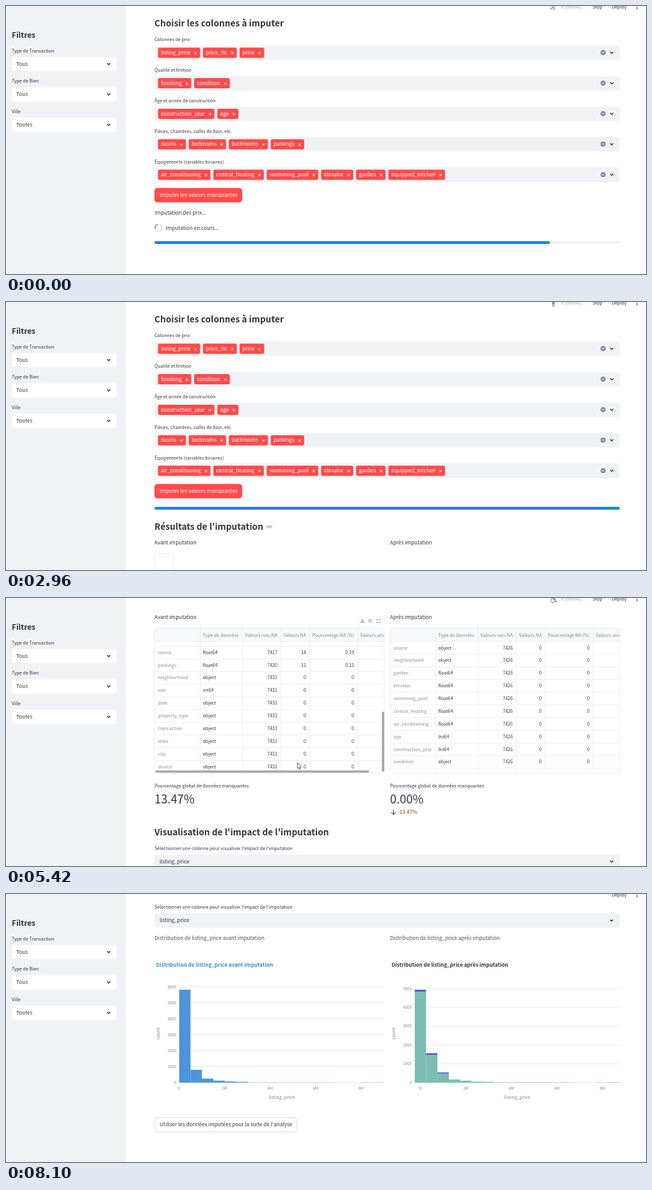
An HTML page with a canvas that plays this animation: 1000 px wide and 420 px high, repeating every 8200 ms.

```html
<!DOCTYPE html>
<html lang="fr">
<head>
<meta charset="utf-8">
<title>Imputation</title>
<style>
html, body { margin: 0; width: 1000px; height: 420px; overflow: hidden; background: #fff; }
canvas { display: block; }
</style>
</head>
<body>
<canvas id="stage" width="1000" height="420"></canvas>
<script>
const ctx = document.getElementById('stage').getContext('2d');
const LOOP = 8200;
const FAMILY = '"Noto Sans CJK JP", "Noto Sans CJK SC", "Noto Sans CJK KR", "Noto Sans CJK TC", "Noto Sans", sans-serif';
const INK = '#31333f', GRAY = '#808495', PANEL = '#f0f2f6', RED = '#ff4b4b', BLUE = '#1c83e1', LINE = '#e6e8ee';
const TINY = 6.1, SMALL = 7.1, BODY = 8.14, TITLE = 13.7, METRIC = 18.3;

// Text is laid out at ten times its size so that advances stay fractional.
function text(str, x, y, size = BODY, color = INK, align = 'left', weight = 400) {
  ctx.save();
  ctx.translate(x, y + size * 0.34);
  ctx.scale(0.1, 0.1);
  ctx.font = `${weight} ${size * 10}px ${FAMILY}`;
  ctx.textAlign = align;
  ctx.fillStyle = color;
  ctx.fillText(str, 0, 0);
  ctx.restore();
}
function textWidth(str, size) {
  ctx.font = `400 ${size * 10}px ${FAMILY}`;
  return ctx.measureText(str).width / 10;
}
function rect(x, y, w, h, color) {
  ctx.fillStyle = color;
  ctx.fillRect(x, y, w, h);
}
function box(x, y, w, h, r, fill, stroke) {
  ctx.beginPath();
  ctx.roundRect(x, y, w, h, r);
  if (fill) { ctx.fillStyle = fill; ctx.fill(); }
  if (stroke) { ctx.strokeStyle = stroke; ctx.lineWidth = 0.8; ctx.stroke(); }
}
function path(points, color, width = 1, x = 0, y = 0) {
  ctx.beginPath();
  points.forEach(([px, py]) => ctx.lineTo(x + px, y + py));
  ctx.strokeStyle = color;
  ctx.lineWidth = width;
  ctx.stroke();
}
function ring(x, y, r, color, width = 1, from = 0, to = Math.PI * 2) {
  ctx.beginPath();
  ctx.arc(x, y, r, from, to);
  ctx.strokeStyle = color;
  ctx.lineWidth = width;
  ctx.stroke();
}
function dot(x, y, r, color) {
  ctx.beginPath();
  ctx.arc(x, y, r, 0, Math.PI * 2);
  ctx.fillStyle = color;
  ctx.fill();
}
function cross(x, y, r, color, width) {
  path([[-r, -r], [r, r]], color, width, x, y);
  path([[-r, r], [r, -r]], color, width, x, y);
}
const chevron = (x, y) => path([[-2.4, -1.2], [0, 1.2], [2.4, -1.2]], INK, 1.4, x, y);

function ease(t, from, to) {
  const p = Math.min(1, Math.max(0, (t - from) / (to - from)));
  return p * p * (3 - 2 * p);
}
const pageScroll = t => 52 * ease(t, 3570, 4080) + 294.5 * ease(t, 4325, 5000)
  + 125 * ease(t, 5760, 6190) + 246.5 * ease(t, 7110, 7980);
const tableScroll = t => 291 * ease(t, 4950, 5410);

// Form
const groups = [
  ['Colonnes de prix', 'listing_price price_ttc price'],
  ['Qualité et finition', 'finishing condition'],
  ['Âge et année de construction', 'construction_year age'],
  ['Pièces, chambres, salles de bain, etc.', 'rooms bedrooms bathrooms parkings'],
  ['Équipements (variables binaires)', 'air_conditioning central_heating swimming_pool elevator garden equipped_kitchen']
];
function drawForm() {
  text('Choisir les colonnes à imputer', 232, 27.7, TITLE, INK, 'left', 700);
  groups.forEach(([label, names], i) => {
    const y = 73.3 + 47.8 * i;
    text(label, 232, y - 20.3, SMALL);
    box(232, y - 11.2, 727, 22.4, 4.5, PANEL);
    let x = 237.5;
    for (const name of names.split(' ')) {
      const w = textWidth(name, BODY);
      box(x, y - 8, w + 19.4, 16, 2.3, RED);
      text(name, x + 4.5, y, BODY, '#fff');
      cross(x + w + 12.4, y + 0.4, 1.9, '#fff', 1);
      x += w + 23.8;
    }
    dot(933, y - 0.3, 3.9, GRAY);
    cross(933, y - 0.3, 1.4, '#fff', 0.9);
    chevron(946.5, y - 0.2);
  });
  box(232, 285.3, 137, 22.4, 4.5, RED);
  text('Imputer les valeurs manquantes', 240, 296.5, BODY, '#fff');
}
function progressBar(y, share) {
  box(232, y - 2.3, 727, 4.6, 2.3, PANEL);
  box(232, y - 2.3, 727 * share, 4.6, 2.3, BLUE);
}
function drawProgress(t) {
  text('Imputation des prix...', 232, 324.2);
  text('Imputation en cours...', 249.5, 348.2);
  const angle = 2.9 + t / 630 * Math.PI * 2;
  ring(238.3, 347.8, 5.4, '#d3d6dc', 1.3);
  ring(238.3, 347.8, 5.4, '#5d84ab', 1.3, angle, angle + Math.PI / 2);
  progressBar(370.8, t < 2690 ? 0.85 : 1);
}

// Tables
const missing = {
  age: 4969, construction_year: 4968, condition: 1974, finishing: 1893, price: 1764, price_ttc: 1712,
  listing_price: 1650, air_conditioning: 1320, central_heating: 1320, swimming_pool: 1320, elevator: 1320,
  garden: 1320, equipped_kitchen: 1320, bathrooms: 41, bedrooms: 27, rooms: 14, parkings: 11,
  neighborhood: 0, size: 0, date: 0, property_type: 0, transaction: 0, state: 0, city: 0, source: 0
};
const objects = 'condition finishing neighborhood date property_type transaction state city source'.split(' ');
const typeOf = (name, ints) => objects.includes(name) ? 'object' : ints[name] || 'float64';
const before = Object.entries(missing).map(([name, n]) =>
  [name, typeOf(name, { size: 'int64' }), 7431 - n, n, n ? (n / 74.31).toFixed(2) : 0]);
const after = ('source neighborhood garden elevator swimming_pool central_heating air_conditioning ' +
  'age construction_year condition').split(' ').map(name =>
  [name, typeOf(name, { age: 'Int64', construction_year: 'Int64' }), 7426, 0, 0]);
const TOP = 393.8, HEIGHT = 227, HEAD = 20.6, ROW = 19.88;

function drawTable(x, rows, scroll) {
  const cells = (values, y, ink, first) => {
    text(values[0], x + 5.5, y, SMALL, first);
    text(values[1], x + 75.5, y, SMALL, ink);
    [192, 237, 312].forEach((edge, i) => text(String(values[i + 2]), x + edge, y, SMALL, ink, 'right'));
  };
  ctx.save();
  ctx.beginPath();
  ctx.roundRect(x, TOP, 359, HEIGHT, 4.5);
  ctx.clip();
  rect(x, TOP, 359, HEIGHT, '#fff');
  rows.forEach((row, i) => {
    const y = 424.6 + ROW * i - scroll;
    if (y < TOP || y > TOP + HEIGHT + 12) return;
    cells(row, y, INK, '#8b8e99');
    rect(x, y + ROW / 2 - 0.3, 359, 0.7, LINE);
  });
  rect(x, TOP, 359, HEAD, '#f8f9fb');
  rect(x, TOP + HEAD - 0.3, 359, 0.8, LINE);
  cells(['', 'Type de données', 'Valeurs non-NA', 'Valeurs NA', 'Pourcentage NA (%)'], 405, GRAY, GRAY);
  text('Valeurs uniques', x + 321.5, 405, SMALL, GRAY);
  [71, 137, 197, 242, 317].forEach(c => rect(x + c, TOP, 0.7, HEIGHT, LINE));
  ctx.restore();
  box(x + 0.4, TOP, 358.6, HEIGHT, 4.5, null, LINE);
}
function drawToolbar(scroll) {
  const y = TOP - 11.3, ink = '#7a7d88';
  box(551, y - 7, 40, 14, 3, '#fff', '#f3f4f7');
  path([[0, -3], [0, 1]], ink, 0.9, 557, y);
  path([[-1.8, -0.8], [0, 1], [1.8, -0.8]], ink, 0.9, 557, y);
  path([[-2.5, 1], [-2.5, 2.5], [2.5, 2.5], [2.5, 1]], ink, 0.9, 557, y);
  ring(568.6, y - 0.6, 1.9, ink, 0.9);
  path([[1.2, 0.8], [3, 2.6]], ink, 1, 568.8, y);
  for (const sx of [-1, 1]) for (const sy of [-1, 1])
    path([[sx, sy * 2.5], [sx * 2.6, sy * 2.5], [sx * 2.6, sy]], ink, 0.9, 582, y);
  box(587.4, TOP + 1 + scroll / 291 * 130, 3.6, 94, 1.8, '#a6a7ad');
  if (scroll > 0) box(233, TOP + HEIGHT - 4, 334.5, 3.4, 1.7, '#a6a7ad');
}
function drawResults(t) {
  progressBar(323.2, 1);
  text("Résultats de l'imputation", 232, 352, TITLE, INK, 'left', 700);
  if (t < 3570) {
    for (const x of [408.8, 413.2]) box(x - 2, 350.3, 4, 3.6, 1.8, null, GRAY);
  }
  text('Avant imputation', 232, 377);
  text('Après imputation', 600, 377);
  if (t < 2990) {
    box(232.5, 394.3, 29, 60, 3, '#fff', '#f6dfe0');
    return;
  }
  const scroll = tableScroll(t);
  drawTable(232, before, scroll);
  drawTable(600, after, 0);
  if (t >= 4080 && t < 5780) drawToolbar(scroll);
  drawMetrics(t);
  drawCharts(t);
}

function drawMetrics(t) {
  for (const x of [232, 600]) text('Pourcentage global de données manquantes', x, 641.3, SMALL);
  text('13.47%', 232, 661.9, METRIC);
  text('0.00%', 600, 661.9, METRIC);
  const selected = 35.7 * ease(t, 6310, 6700);
  if (selected > 0) {
    ctx.save();
    ctx.beginPath();
    ctx.rect(600, 648.5, selected, 26);
    ctx.clip();
    rect(600, 648.5, selected, 26, '#3367d1');
    text('0.00%', 600, 661.9, METRIC, '#fff');
    ctx.restore();
  }
  const red = '#84301f';
  path([[0, -3.8], [0, 3.6]], red, 1.1, 605.5, 682);
  path([[-3.4, 0.4], [0, 3.8], [3.4, 0.4]], red, 1.1, 605.5, 682);
  text('-13.47%', 612, 682, BODY, red);
}

// Histograms
const BASE = 1013.5, BIN = 17.77;
const charts = [
  { x: 232, when: 'avant', color: '#4c95d9', tail: '#a9e0ea', unit: 25, max: 6, zero: 270.5,
    bars: [5820, 800, 250, 120, 70, 45], caps: [] },
  { x: 600, when: 'après', color: '#7dbdb1', tail: '#a5dcd8', unit: 29.4, max: 5, zero: 647.5,
    bars: [4850, 1480, 490, 165, 100, 45, 35], caps: [95, 85, 50] }
];
function drawCharts(t) {
  text("Visualisation de l'impact de l'imputation", 232, 714.2, TITLE, INK, 'left', 700);
  text("Sélectionner une colonne pour visualiser l'impact de l'imputation", 232, 738.7, SMALL);
  box(232, 748.4, 727, 22.4, 4.5, PANEL);
  text('listing_price', 240, 759.6);
  chevron(946.3, 759.4);
  for (const c of charts) {
    const title = `Distribution de listing_price ${c.when} imputation`;
    const left = c.x + 38.6;
    text(title, c.x, 787, BODY, '#4a4c58');
    text(title, c.x + 2.5, 829, BODY, c.when === 'avant' && t > 7950 ? '#4585c2' : INK, 'left', 700);
    for (let k = 0; k <= c.max; k++) {
      const y = BASE - k * c.unit;
      rect(left, y - 0.4, 320.4, 0.8, '#e6e8ec');
      text(String(k * 1000), c.x + 34, y, TINY, GRAY, 'right');
    }
    rect(left, BASE - 0.7, BIN * 14, 1, c.tail);
    rect(left + BIN * 16, BASE - 0.7, BIN * 2, 1, c.tail);
    c.bars.forEach((n, i) => {
      const h = n * c.unit / 1000, cap = (c.caps[i] || 0) * c.unit / 1000;
      rect(left + i * BIN, BASE - h, BIN, h, c.color);
      if (cap) rect(left + i * BIN, BASE - h - cap, BIN, cap, '#4a55da');
    });
    for (let k = 0; k < 5; k++)
      text(k ? 2 * k + 'M' : '0', c.zero + 71.1 * k, 1023.2, TINY, GRAY, 'center');
    text('listing_price', c.x + 199, 1036.8, SMALL, GRAY, 'center');
    ctx.save();
    ctx.translate(c.x + 5.5, 936.5);
    ctx.rotate(-Math.PI / 2);
    text('count', 0, 0, SMALL, GRAY, 'center');
    ctx.restore();
  }
  box(232.4, 1068.6, 222, 22.2, 4.5, '#fff', '#d3d4d9');
  text("Utiliser les données imputées pour la suite de l'analyse", 240, 1079.6);
}

// Fixed parts
function drawSidebar() {
  rect(0, 0, 187, 420, PANEL);
  text('Filtres', 9, 46.3, 11.8, INK, 'left', 700);
  [['Type de Transaction', 'Tous'], ['Type de Bien', 'Tous'], ['Ville', 'Toutes']].forEach(([label, value], i) => {
    const y = 91 + 47.7 * i;
    text(label, 9, y - 20.8, SMALL);
    box(9, y - 11.3, 164, 22.4, 4.5, '#fff');
    text(value, 16, y);
    chevron(160.5, y - 0.3);
  });
}
const ICONS = 'rsbwrbswrbrwrbswrbswrbsrbswbsrwbsrbswrbs';
const icons = {
  r(c) {
    path([[1, -3], [0, 1.5], [2.6, 3.5], [2, 7]], c, 1.4, 854, 0);
    path([[0, 1.5], [-1.4, 4.5], [-4, 4.8]], c, 1.3, 854, 0);
    path([[-3, 1], [-1, -1], [2, 0], [4.5, 1]], c, 1.1, 854, 0);
  },
  b(c) {
    ring(851.2, 4, 3.1, c);
    ring(859.3, 4, 3.1, c);
    path([[-2, 0], [1, 2], [0.6, 4.5]], c, 1.2, 855, 0);
    path([[0, -1], [4, 1]], c, 1, 855, 0);
  },
  s(c) {
    rect(853, -2, 4.4, 5, c);
    path([[-1, 0], [-1, 7.2]], c, 1.3, 855.2, 0);
    path([[1, 0], [1, 7.2]], c, 1.3, 855.2, 0);
  },
  w(c) {
    ring(854.6, 3.6, 3.3, c, 1.1);
    path([[0, -2], [0, 2], [3.2, 2], [4.6, 6], [6, 5.6]], c, 1.3, 855, 0);
  }
};
function drawHeader(t) {
  rect(187, 0, 813, 15, '#fff');
  if (t < 7900) {
    icons[ICONS[Math.floor(t / 205)]]('#8d8f98');
    text('RUNNING...', 867, 1.8, SMALL, '#a9abb3');
    text('Stop', 916.5, 1.8, SMALL);
  }
  text('Deploy', 946.3, 1.8, SMALL);
  for (const y of [-0.9, 1.8, 4.5]) dot(986, y, 0.9, INK);
}
function drawCursor(x, y) {
  ctx.beginPath();
  [[0, 0], [0, 9.2], [2.2, 7.3], [3.6, 10.4], [5, 9.8], [3.7, 6.8], [6.4, 6.6]]
    .forEach(([px, py]) => ctx.lineTo(x + px, y + py));
  ctx.closePath();
  ctx.fillStyle = '#fff';
  ctx.fill();
  ctx.strokeStyle = '#333';
  ctx.lineWidth = 0.8;
  ctx.stroke();
}

function draw(t) {
  rect(0, 0, 1000, 420, '#fff');
  ctx.save();
  ctx.translate(0, -pageScroll(t));
  drawForm();
  if (t < 2960) drawProgress(t);
  else drawResults(t);
  ctx.restore();
  drawHeader(t);
  drawSidebar();
  if (t >= 960 && t < 2790) drawCursor(458.8, 349);
  if (t >= 5190 && t < 5780) drawCursor(455.3, 258.3);
}
const start = performance.now();
function tick() {
  draw((performance.now() - start) % LOOP);
  requestAnimationFrame(tick);
}
tick();
</script>
</body>
</html>
```
